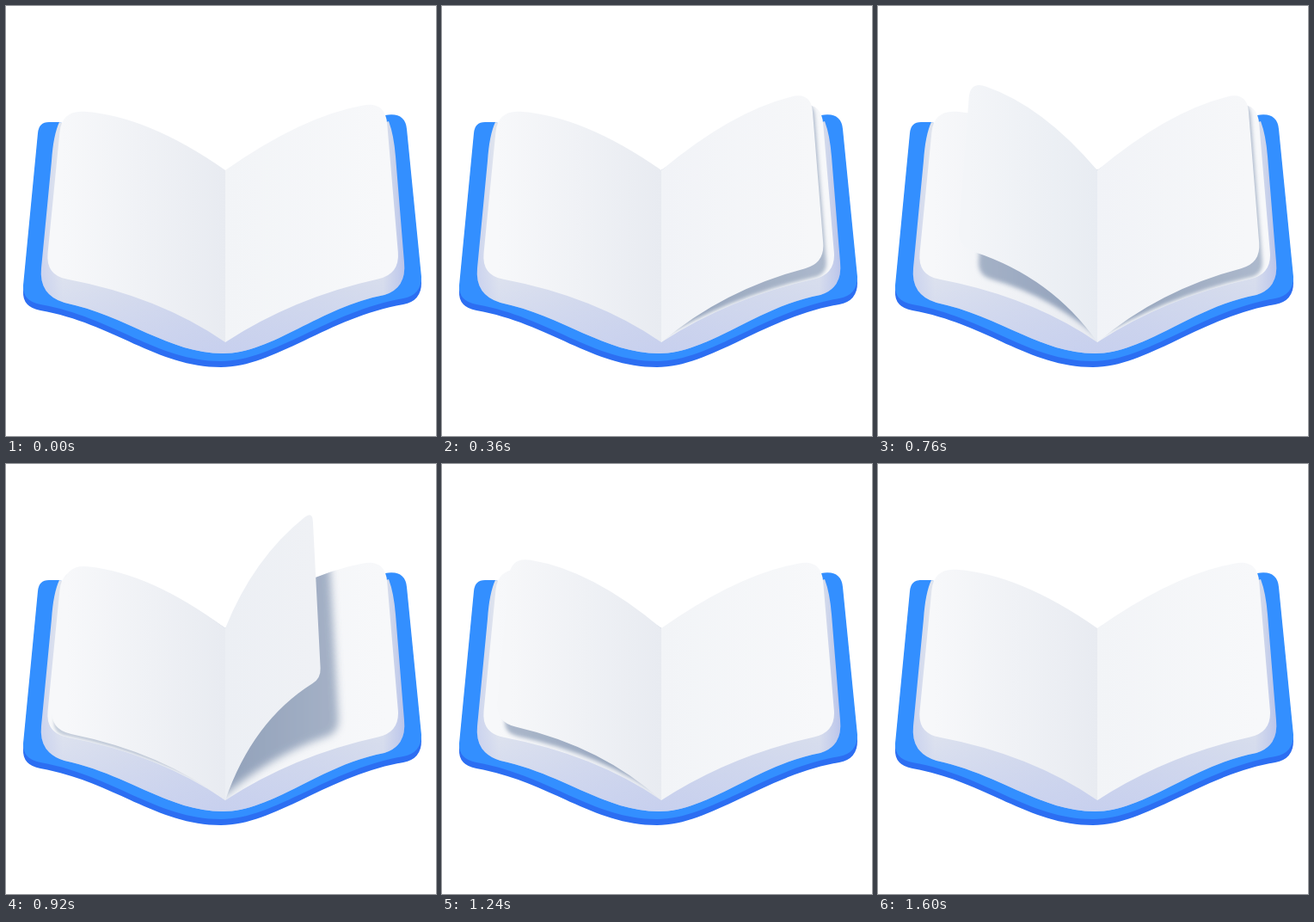
Animation, 500 px wide and 500 px high, one loop 1960 ms. Source, as an HTML page:

```html
<!DOCTYPE html>
<html lang="en">
<head>
<meta charset="utf-8">
<title>Book</title>
<style>
html, body { margin: 0; width: 100%; height: 100%; overflow: hidden; background: #fff; }
svg { display: block; width: 100vw; height: 100vh; }
</style>
</head>
<body>
<svg viewBox="0 0 500 500">
  <defs>
    <path id="cover" d="M37 148Q38 135 50 135H62L255 200L441 127Q464 123 466 143L483 315Q483 336 462 340C375 355 312 413 250 413C175 413 125 362 40 347Q19 343 20 325Z"/>
    <path id="block" d="M62 135Q55 150 53 180L41 305Q38 336 68 345C140 360 190 404 252 404C310 404 365 350 440 336Q466 328 463 298L453 175Q451 150 445 134L255 200Z"/>
    <linearGradient id="across" gradientUnits="userSpaceOnUse" x1="40" x2="464" y1="0" y2="0">
      <stop offset="0" stop-color="#ccd4ee"/><stop offset=".06" stop-color="#e3e7ee"/>
      <stop offset=".5" stop-color="#d2d9ea"/><stop offset=".94" stop-color="#dde2ec"/>
      <stop offset="1" stop-color="#b8c3ea"/>
    </linearGradient>
    <linearGradient id="down" gradientUnits="userSpaceOnUse" x1="0" x2="0" y1="280" y2="405">
      <stop offset="0" stop-color="#c3ccf0" stop-opacity="0"/>
      <stop offset="1" stop-color="#c3ccf0" stop-opacity=".7"/>
    </linearGradient>
    <clipPath id="clipL"><use href="#baseL"/></clipPath>
    <clipPath id="clipR"><use href="#baseR"/></clipPath>
  </defs>
  <use href="#cover" y="7" fill="#2c6ef2"/>
  <use href="#cover" fill="#338fff"/>
  <use href="#block" fill="url(#across)"/>
  <use href="#block" fill="url(#down)"/>
  <path id="baseL"/>
  <path id="baseR"/>
  <g id="leaves"></g>
</svg>
<script>
const LOOP = 1960, STEP = 40, LAST = 1600;
const SPINE = 255, TOP = 191, BOTTOM = 391;
const PACE = 148, REACH = 450;

// Outer corners and the bend points of the upper and lower edges
const RIGHT = { tip: [441, 111], foot: [458, 312], up: [345, 128], low: [335, 339] };
const MID = { tip: [273, 43], foot: [276, 236], up: [257, 125], low: [261, 310] };
const LEFT = { tip: [65, 121], foot: [46, 313], up: [165, 128], low: [178, 338] };

const $ = id => document.getElementById(id);
const mix = (a, b, u) => a + (b - a) * u;

function set(el, attrs) {
  for (const k in attrs) el.setAttribute(k, attrs[k]);
}
function add(parent, tag, attrs = {}) {
  const el = document.createElementNS('http://www.w3.org/2000/svg', tag);
  set(el, attrs);
  return parent.appendChild(el);
}

function tone(d) {
  const from = [247, 248, 250], to = [180, 192, 212];
  return `rgb(${from.map((v, i) => Math.round(mix(v, to[i], d)))})`;
}

function toward([x, y], [px, py], r) {
  const d = Math.hypot(px - x, py - y) || 1;
  return [x + (px - x) * r / d, y + (py - y) * r / d];
}

function outline({ tip, foot, up, low }, r, x = SPINE) {
  return `M${x} ${TOP}Q${up} ${toward(tip, up, r)}Q${tip} ${toward(tip, foot, r)}`
    + `L${toward(foot, tip, r)}Q${foot} ${toward(foot, low, r)}Q${low} ${x} ${BOTTOM}Z`;
}

// c runs from 1 (lying right) through 0 (upright) to -1 (lying left)
function leafPose(c) {
  const rest = c > 0 ? RIGHT : LEFT, w = Math.abs(c);
  const rise = 1 - w ** 2.5, bow = 64 * w * (1 - w);
  const point = (k, spread, lift) => [
    mix(MID[k][0], rest[k][0], spread),
    mix(rest[k][1], MID[k][1], rise) - lift
  ];
  return {
    tip: point('tip', w, 0), foot: point('foot', w, 0),
    up: point('up', w ** 1.5, bow), low: point('low', w ** 1.5, bow)
  };
}

// The resting page squeezed toward the spine
function castShape(rest, s) {
  const squeezed = {};
  for (const k in rest) squeezed[k] = [mix(SPINE, rest[k][0], s), rest[k][1]];
  return outline(squeezed, 16, rest === RIGHT ? SPINE - 8 : SPINE + 8);
}

function gradient(parent, id, x1, x2, near, far) {
  const el = add(parent, 'linearGradient', { id, gradientUnits: 'userSpaceOnUse', x1, x2, y1: 0, y2: 0 });
  const inner = add(el, 'stop', { offset: 0, 'stop-color': near });
  const outer = add(el, 'stop', { offset: 1, 'stop-color': far });
  return { el, inner, outer };
}

const defs = document.querySelector('defs');
for (const [side, rest, near] of [['L', LEFT, .23], ['R', RIGHT, .08]]) {
  gradient(defs, 'page' + side, SPINE, rest.tip[0], tone(near), tone(0));
  gradient(defs, 'shade' + side, SPINE, rest.tip[0], '#8193b0', '#9fadc3');
  set($('base' + side), { d: outline(rest, 26), fill: `url(#page${side})` });
}

function makeLeaf(upright, i) {
  const g = add($('leaves'), 'g');
  const filter = add(g, 'filter', { id: 'soft' + i, filterUnits: 'userSpaceOnUse', x: 0, y: 0, width: 500, height: 500 });
  const blur = add(filter, 'feGaussianBlur');
  const shade = side => add(
    add(g, 'g', { 'clip-path': `url(#clip${side})` }),
    'path', { fill: `url(#shade${side})`, filter: `url(#soft${i})` });
  return {
    upright, g, blur, shadeR: shade('R'), shadeL: shade('L'),
    paint: gradient(g, 'leaf' + i, SPINE, SPINE, '', ''),
    page: add(g, 'path', { fill: `url(#leaf${i})` })
  };
}

function drawLeaf(leaf, time) {
  const t = time - leaf.upright;
  const active = Math.abs(t) < REACH;
  set(leaf.g, { display: active ? 'inline' : 'none' });
  if (!active) return;

  const c = -Math.tanh(t / PACE) / Math.tanh(REACH / PACE), w = Math.abs(c);
  const pose = leafPose(c);
  const cast = (el, rest, s) => set(el, {
    d: castShape(rest, s),
    opacity: .85 * Math.min(1, (1 - w) * 30, s * 6)
  });
  cast(leaf.shadeR, RIGHT, Math.max(0, .31 + .69 * c));
  cast(leaf.shadeL, LEFT, c < 0 ? w ** 1.8 : 0);
  set(leaf.blur, { stdDeviation: 1.5 + 6 * (1 - w) });

  const reach = pose.tip[0] - SPINE;
  set(leaf.paint.el, { x2: SPINE + Math.sign(reach) * Math.max(24, Math.abs(reach)) });
  set(leaf.paint.inner, { 'stop-color': tone(mix(.23, .08, (c + 1) / 2) + .2 * (1 - w) ** 2) });
  set(leaf.paint.outer, { 'stop-color': tone(.16 * (1 - w * w)) });
  set(leaf.page, { d: outline(pose, 4 + 22 * w ** 1.5) });
}

const leaves = [600, 1000].map(makeLeaf);

function draw(ms) {
  const t = Math.min(LAST, Math.floor(ms % LOOP / STEP) * STEP);
  leaves.forEach(leaf => drawLeaf(leaf, t));
}

const start = performance.now();
function tick() {
  draw(performance.now() - start);
  requestAnimationFrame(tick);
}
tick();
</script>
</body>
</html>
```
